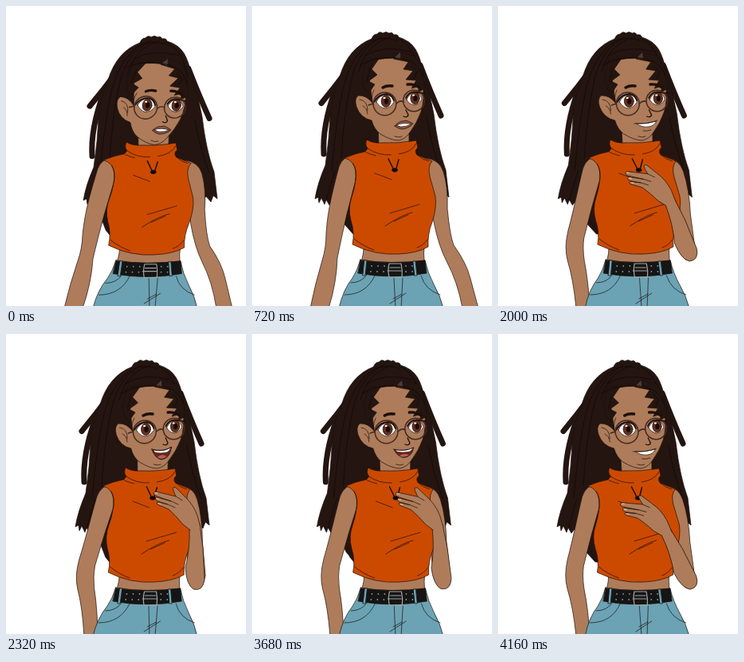
An HTML page that plays this animation: 301x375 px, repeating every 4.2 s.

```html
<!DOCTYPE html>
<html lang="en">
<head>
<meta charset="utf-8">
<style>
html, body { margin: 0; width: 100%; height: 100%; overflow: hidden; background: #fff; }
svg { display: block; width: 100vw; height: 100vh; }
path, circle, ellipse { stroke: #1c100b; stroke-width: .7; stroke-linejoin: round; stroke-linecap: round; }
.skin { fill: #ae7c5a; }
.hair { fill: #241511; }
.shirt { fill: #cc4a00; }
.jeans { fill: #6ba3b4; }
.belt { fill: #151515; }
.white { fill: #fff; }
.iris { fill: #64301f; }
.line { fill: none; }
.lock { fill: none; stroke: #241511; stroke-width: 7; }
.strand { fill: none; stroke: #120907; stroke-width: .8; }
.brow { fill: none; stroke: #1d100c; stroke-width: 3.4; }
.lash { fill: none; stroke: #1d100c; stroke-width: 1.8; }
.rim { fill: none; stroke: #452a22; stroke-width: 1.5; }
.metal { fill: none; stroke: #a5a5a5; stroke-width: 1.2; }
.holes { fill: none; stroke: #8b9296; stroke-width: 1.8; stroke-dasharray: 0 8; }
</style>
</head>
<body>
<svg viewBox="0 0 301 375" preserveAspectRatio="none">
  <g id="hair">
    <path class="lock" d="M121 78Q104 101 87 121.500"/>
    <path class="lock" d="M104 106Q88 150 90 185"/>
    <path class="lock" d="M211 74Q224 108 237 137"/>
    <path class="hair" d="M150 41Q152 35 157 35Q160 31 164 34Q168 31 172 34Q176 32 178 36Q183 35 184 39Q198 43 205 54Q211 64 214 80Q223 108 228 135Q233 178 243 205L247 239L242 235L239 243L233 236L190 285H127L116 273L104 249L101 244L97 249L93 242L91 248L87 240L84 246L83 239L79 241Q82 222 92 199Q97 165 98 135Q100 112 110 88Q121 52 150 41Z"/>
    <path class="strand" d="M152 42Q124 62 115 100T100 205M162 39Q133 53 124 95T112 190M174 39Q143 47 134 82M182 40Q204 49 210 85M104 206Q98 225 93 243M112 200Q109 225 101 244M219 140Q225 175 237 206M153 43Q165 38 182 43M142 62Q164 48 198 57"/>
  </g>

  <g id="body">
    <path class="hair" d="M124 232L131 240L128 286L122 279L115 262Z"/>
    <g class="worried">
      <path class="skin" d="M128 187Q114 187 109 201C103 224 95 252 93 284Q93 303 88 318Q79 348 73 378H96Q106 347 107 315Q112 290 119 260L131 214Z"/>
      <path class="skin" d="M218 190Q235 192 240 207Q246 226 245 253Q248 286 253 299Q269 321 274 341L284 378H264Q258 345 244 319Q234 300 228 270L220 210Z"/>
    </g>
    <g class="happy">
      <path class="skin" d="M128 187Q114 189 109 203C103 225 98 250 89 282Q84 302 88 318Q95 342 98 378H115Q114 345 109 318Q107 302 109 290Q115 268 120 250L131 214Z"/>
      <path class="skin" d="M216 190Q230 192 235 207Q242 229 243 260L248 302Q245 319 236 317L225 285L218 210Z"/>
    </g>
    <path class="skin" d="M140 295Q141 310 136 322H217Q214 310 217 295Z"/>
    <path class="jeans" d="M136 317Q175 324 217 318Q220 333 229 350Q236 362 240 378H109Q114 355 126 340Q132 331 136 317Z"/>
    <path class="line" d="M116 361Q143 361 154 337M124 346Q137 346 144 336M236 361Q217 355 212 337M178 340L180 378M189 340L187 378M173 372L193 359M177 366L188 360"/>
    <path class="belt" d="M136 318Q175 323 217 318L219 334Q175 342 133 334Z"/>
    <path class="jeans" d="M141 318H144L142 337H139ZM202 319H205L207 337H204Z"/>
    <path class="holes" d="M150 325H168M149 332H168M193 325H202M193 332H202"/>
    <path class="metal" d="M172 322H187Q189 331 188 339H172Q170 330 172 322ZM170 331H187M173 327H186"/>
    <path class="skin" d="M158 148L159 174H197V150Z"/>
    <path class="shirt" d="M144 167Q151 172 164 171Q184 172 206 168L208 177Q203 181 207 186L226 194Q220 200 223 213L230 238Q232 252 226 270Q220 285 221 301Q207 309 184 310Q154 312 126 298Q129 283 124 268Q120 253 125 239Q131 221 130 207Q128 193 116 190Q130 184 142 182L145 178Q141 173 144 167Z"/>
    <path class="line" d="M145 178Q158 187 174 186M206 172Q200 183 184 185M143 183Q150 186 155 187M154 209L175 217M173 259L210 248M167 275Q188 261 201 258M178 269L196 261M128 291Q139 300 153 305M207 186Q214 192 221 194M220 292Q214 300 207 302M127 197Q132 206 130 218"/>
    <path class="line" style="stroke-width:1.500" d="M171 191L177 203M184 192L181 203"/>
    <ellipse cx="179" cy="205" rx="3.500" ry="2.300" fill="#100b0a"/>

    <g id="head">
      <path class="skin" d="M151 121Q143 111 133 112Q128 116 131 126Q136 140 150 143Q153 154 161 160Q174 168 184 168Q193 166 198 158Q207 146 212 132Q217 116 214 98Q212 76 198 68Q177 63 157 67L147 78Q146 88 148 98Z"/>
      <path class="line" d="M135 117Q145 118 145 131M139 125Q144 127 145 135M179 163Q184 165 188 163M153 105Q148 115 152 124"/>
      <path class="hair" d="M144 66L159 66L150 79L157 86L146 94L154 98L147 108L141 104L138 90Z"/>
      <path class="hair" d="M178 66L187 58L205 63L213 78L217 103L208 108L210 100L200 103L206 93L193 92L202 81L190 79L196 70Z"/>
      <path d="M178 65L186 57L187 67Z" fill="#4a3c37"/>
      <path class="strand" d="M136 74Q160 60 190 66Q208 70 214 87M148 77L144 94M200 75L207 82L203 91"/>
      <path class="brow" d="M164 102Q169 99 176 100M195 98Q203 97 210 102"/>

      <path class="white" d="M156 120Q160 111 169 111Q176 112 178 120Q174 127 167 128Q160 127 156 120Z"/>
      <path class="white" d="M194 117Q198 108 205 109Q211 110 213 116Q210 123 204 124Q197 123 194 117Z"/>
      <ellipse class="iris" cx="168" cy="119" rx="6" ry="7.500"/>
      <ellipse class="iris" cx="204.500" cy="115.500" rx="5.700" ry="7.300"/>
      <ellipse cx="168.500" cy="119" rx="2.500" ry="3.500" fill="#160b08"/>
      <ellipse cx="205" cy="115.500" rx="2.300" ry="3.500" fill="#160b08"/>
      <path d="M165.500 115h1M202 111.500h1" style="stroke:#fff;stroke-width:2"/>
      <path class="lash" d="M153 120Q159 110 169 110Q176 111 178 118M193 115Q197 107 205 107.500Q213 109 217 109"/>
      <path class="rim" d="M146 124L152 122M181 122Q186 117 190 120"/>
      <circle class="rim" cx="166.500" cy="122.300" r="14.400"/>
      <circle class="rim" cx="203" cy="118.500" r="13.300"/>
      <path class="line" style="stroke-width:1.300" d="M193 130L196 136Q195 140 190 138"/>

      <g class="worried">
        <path d="M179 150Q184 144 189 144L193 143Q199 145 202 147Q197 153 188 154Q182 153 179 150Z" fill="#8e5545"/>
        <path class="white" d="M181 149Q190 145 200 147.500Q194 151 187 151Z"/>
      </g>
      <g class="happy">
        <g id="laugh">
          <path d="M176 144Q190 148 201 141Q199 156 188 157Q180 155 176 144Z" fill="#6d2420"/>
          <path class="white" d="M178 145Q190 148 200 142Q199 146 195 148Q187 150 180 148Z"/>
          <path d="M183 154Q189 149 195 153Q189 158 183 154Z" fill="#b76057" style="stroke:none"/>
        </g>
        <g id="grin">
          <path class="white" d="M177 147Q190 148 202 144Q199 150 192 151Q183 152 177 147Z"/>
          <path class="line" d="M174 147Q190 148 203 143M185 156Q190 157 195 155"/>
        </g>
      </g>
    </g>
  </g>

  <g id="forearm" class="happy">
    <path class="skin" style="stroke:none" d="M242 234L230 242Q231 268 225 292Q226 313 235 319Q247 322 249 307L247 268Z"/>
    <path class="line" d="M230 244Q231 268 225 292Q226 313 235 319Q247 322 249 307L247 268L243 238"/>
    <g id="hand">
      <path class="skin" d="M231 245L222 238Q212 226 204 219L192 214Q187 212 190 210L203 213L190 209Q185 206 189 204L207 209L187 202Q183 198 188 197L213 203L210 196Q208 190 213 192L224 203Q235 213 240 227L244 242"/>
      <path class="line" d="M203 213L212 217M207 209L216 213M213 203L221 208"/>
      <path d="M187 198.500L190 199M189 205.500L192 206.500M191 211.500L194 212.500" style="stroke:#d9b79c;stroke-width:1.300"/>
    </g>
  </g>
</svg>
<script>
const LOOP = 4200, STEP = 80, FLOOR = 375, SWAP = 1920;
const el = id => document.getElementById(id);
const move = (id, value) => el(id).setAttribute('transform', value);
const show = (node, on) => node.style.display = on ? '' : 'none';
const smooth = u => u * u * (3 - 2 * u);
const out = u => 1 - (1 - u) ** 2;

// time, hair shift, body lean, squash, arm reach
const keys = [
  [0, 18, 7, 3, 0],
  [720, 0, 0, 0, 0],
  [1600, 0, 0, 0, 0],
  [SWAP, -5, -4, 0, 1],
  [2320, 8, 6, 0, 0],
  [3280, 8, 6, 0, 0],
  [4160, -5, -4, 0, 1]
];

function pose(t) {
  let i = keys.length - 2;
  while (keys[i][0] > t) i--;
  const from = keys[i], to = keys[i + 1];
  const u = Math.min(1, (t - from[0]) / (to[0] - from[0]));
  const e = i ? smooth(u) : out(u);
  return from.map((v, n) => v + (to[n] - v) * e).slice(1);
}

function draw(now) {
  const t = Math.floor(now % LOOP / STEP) * STEP;
  const [sway, lean, squash, reach] = pose(t);
  const happy = t >= SWAP, grin = reach > .65;
  const sy = 1 - squash / 205, skew = -lean / 205, dy = FLOOR * (1 - sy);
  const turn = -24 * reach ** 2;

  move('hair', `matrix(1 0 0 ${sy} ${sway} ${dy})`);
  move('body', `matrix(1 0 ${skew} ${sy} ${-skew * FLOOR} ${dy})`);
  move('head', `translate(0 ${squash * .8}) rotate(${squash * 2} 180 122)`);
  move('forearm', `translate(${reach * 4} ${-reach * 2}) rotate(${turn} 241 316)`);
  move('hand', `rotate(${-turn * .65} 237 241)`);
  move('laugh', `translate(0 ${reach * 65}) scale(1 ${1 - reach * .45})`);
  document.querySelectorAll('.worried').forEach(n => show(n, !happy));
  document.querySelectorAll('.happy').forEach(n => show(n, happy));
  show(el('laugh'), !grin);
  show(el('grin'), grin);
}

const start = performance.now();
(function tick() {
  draw(performance.now() - start);
  requestAnimationFrame(tick);
})();
</script>
</body>
</html>
```
